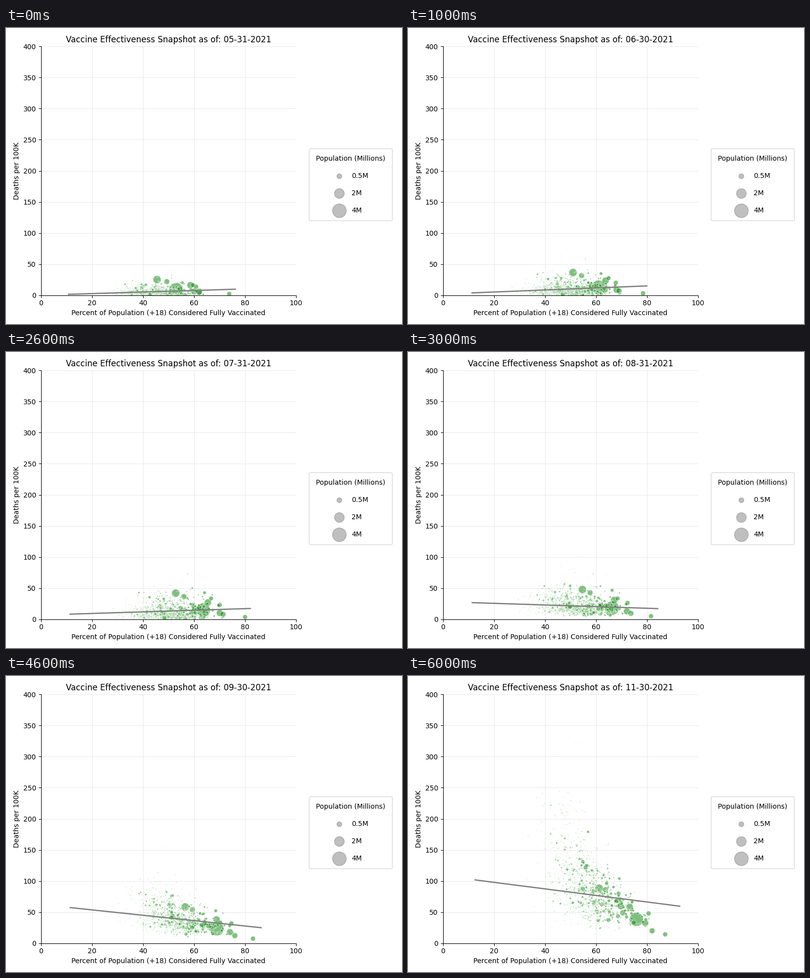
A matplotlib script for the animation above (7 s loop, 800 px wide and 600 px high).

```python
import numpy as np
import matplotlib.pyplot as plt
from matplotlib.animation import FuncAnimation

DATES = ["05-31", "06-30", "07-31", "08-31", "09-30", "10-31", "11-30"]
MONTHS = np.arange(len(DATES))

# Shared progress: vaccination from first to last month, early and late death waves
RAMP = np.interp(MONTHS, [0, 1, 4, 5, 6], [0, .35, .7, .93, 1])
EARLY = np.interp(MONTHS, [0, 1, 2], [.6, .87, 1])
LATE = np.clip((MONTHS - 2) / 4, 0, 1) ** 1.5

# Ends of the trend line
LEFT_X = np.interp(MONTHS, [0, 1, 4, 6], [10.8, 11.4, 11.5, 12.6])
RIGHT_X = np.interp(MONTHS, [0, 1, 4, 5, 6], [76.2, 79.9, 86.3, 92.1, 92.8])
LEFT_Y = [1.5, 3.8, 8.2, 26.7, 57.3, 81, 101.8]
RIGHT_Y = [9.7, 15, 17.3, 17.1, 25, 40.6, 59.6]

# Radius in px, first and last share vaccinated, early and final deaths
LARGEST = [
    (14, 53, 75.8, 15, 38.3),
    (8, 45.5, 61.2, 42, 88.5),
    (7, 58.6, 73.2, 27, 58.6),
    (6.7, 62, 79.3, 10, 32.5),
    (6.7, 60, 69.7, 10, 59.5),
    (5.7, 49.3, 63.7, 36.4, 86),
    (5.7, 54.4, 70.5, 17, 49),
    (5.7, 62, 82, 8, 20),
    (4.8, 73.8, 87.1, 3.6, 14.3),
    (4.8, 60.8, 80.6, 23, 48),
]


def evolve(first, last, early, final, early_pace=1, late_pace=1):
    """Share vaccinated and deaths of every county, one column per month."""
    column = lambda values: np.reshape(values, (-1, 1))
    share = column(first) + column(last - first) * RAMP
    deaths = (column(early) * EARLY ** column(early_pace)
              + column(final - early) * LATE ** column(late_pace))
    return share, deaths


def make_cloud(count=1500):
    """Random counties; larger ones are better vaccinated and less scattered."""
    rng = np.random.default_rng(8)
    size = rng.normal(size=count)
    radius = np.minimum(.68 * np.exp(.72 * size), 4.5)
    last = np.clip(54.5 + 5 * size + 7.5 * rng.normal(size=count), 15, 92)
    first = last * rng.normal(.75, .04, count)
    early = rng.gamma(1.4, 9.5, count)
    shape = 4 + 4 * np.maximum(size, 0)
    mean = 80 * np.exp(-.033 * (np.maximum(last, 45) - 60))
    final = np.maximum(mean * rng.gamma(shape, 1 / shape), early)
    paces = rng.uniform(1, 2.5, count), rng.uniform(.7, 1.3, count)
    return radius, *evolve(first, last, early, final, *paces)


largest = np.array(LARGEST).T
groups = [(largest[0], *evolve(*largest[1:])), make_cloud()]
radius, share, deaths = (np.concatenate(part) for part in zip(*groups))

plt.rcParams["font.family"] = "DejaVu Sans"
fig, ax = plt.subplots(figsize=(8, 6), dpi=100)
ax.set(xlim=(0, 100), ylim=(0, 400), ylabel="Deaths per 100K",
       xlabel="Percent of Population (+18) Considered Fully Vaccinated")
ax.spines[["top", "right"]].set_visible(False)
ax.grid(alpha=.25)

dots = ax.scatter(share[:, 0], deaths[:, 0], s=(1.44 * radius) ** 2, c="green",
                  alpha=.5, edgecolors="white", linewidths=.9)
trend, = ax.plot([], [], color="gray", lw=1.9)
title = ax.set_title("")

for millions in (.5, 2, 4):
    ax.scatter([], [], s=100 * millions, c="gray", alpha=.5, label=f"{millions:g}M")
ax.legend(title="Population (Millions)", scatterpoints=1, labelspacing=1.5,
          borderpad=1, loc=(1.05, .3))


def draw(month):
    dots.set_offsets(np.column_stack([share[:, month], deaths[:, month]]))
    trend.set_data([LEFT_X[month], RIGHT_X[month]], [LEFT_Y[month], RIGHT_Y[month]])
    title.set_text(f"Vaccine Effectiveness Snapshot as of: {DATES[month]}-2021")
    return dots, trend, title


draw(0)
fig.tight_layout()
anim = FuncAnimation(fig, draw, frames=len(DATES), init_func=lambda: draw(0),
                     interval=1000, repeat=True, repeat_delay=0)
plt.show()
```
